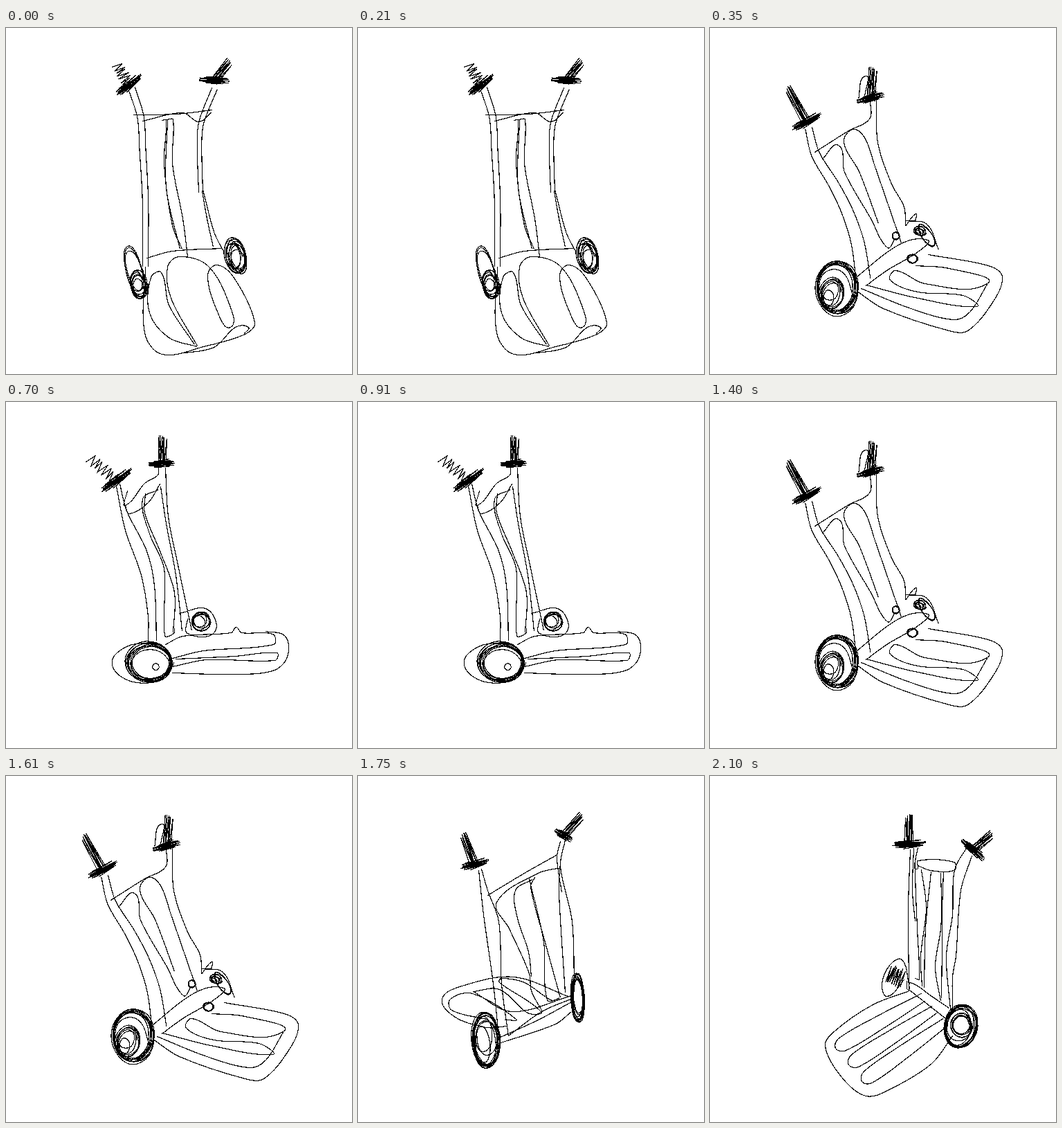
Animation, 500 px wide and 500 px high, one loop 2.45 s. Source, as an HTML page:

```html
<!DOCTYPE html>
<html lang="en">
<head>
<meta charset="utf-8">
<title>Hand truck turnaround</title>
<style>
  html, body { margin: 0; width: 100%; height: 100%; overflow: hidden; background: #fff; }
  svg { display: block; width: 100vw; height: 100vh; }
  path { fill: none; stroke: #000; stroke-width: 1.2; shape-rendering: crispEdges; }
  .pose { visibility: hidden; animation: turn 2450ms step-end infinite; }
  @keyframes turn {
    0% { visibility: visible; }
    14.2857%, 100% { visibility: hidden; }
  }
</style>
</head>
<body>
<svg id="stage" viewBox="0 0 500 500"></svg>
<script>
const STEP = 350, LOOP = 2450;
const stage = document.getElementById('stage');
let d, seed;

const random = () => (seed = (seed * 16807) % 2147483647) / 2147483647;
const jitter = size => (random() - 0.5) * 2 * size;
const at = (x, y) => `${(x + 0.5).toFixed(1)} ${(y + 0.5).toFixed(1)} `;

// Smooth pen stroke through x, y pairs; handles are a third of each segment
function pen(...xy) {
  const pts = [];
  for (let i = 0; i < xy.length; i += 2) pts.push([xy[i], xy[i + 1]]);
  const dirs = pts.map((p, i) => {
    const a = pts[i - 1] || p, b = pts[i + 1] || p;
    const len = Math.hypot(b[0] - a[0], b[1] - a[1]) || 1;
    return [(b[0] - a[0]) / len, (b[1] - a[1]) / len];
  });
  d += 'M' + at(...pts[0]);
  for (let i = 1; i < pts.length; i++) {
    const [x1, y1] = pts[i - 1], [x2, y2] = pts[i], [ux, uy] = dirs[i - 1], [vx, vy] = dirs[i];
    const h = Math.hypot(x2 - x1, y2 - y1) / 3;
    d += 'C' + at(x1 + ux * h, y1 + uy * h) + at(x2 - vx * h, y2 - vy * h) + at(x2, y2);
  }
}

// Two sides of a bar along a centre line, its width going from w1 to w2
function tube(w1, w2, ...xy) {
  const left = [], right = [], last = xy.length - 2;
  for (let i = 0; i <= last; i += 2) {
    const a = Math.max(i - 2, 0), b = Math.min(i + 2, last);
    const dx = xy[b] - xy[a], dy = xy[b + 1] - xy[a + 1];
    const k = (w1 + (w2 - w1) * i / last) / 2 / Math.hypot(dx, dy);
    left.push(xy[i] - dy * k, xy[i + 1] + dx * k);
    right.push(xy[i] + dy * k, xy[i + 1] - dx * k);
  }
  pen(...left);
  pen(...right);
}

// Straight slat with one rounded end
function slat(x1, y1, x2, y2, width) {
  const dx = x2 - x1, dy = y2 - y1, k = width / 2 / Math.hypot(dx, dy);
  const point = (t, side) => [x1 + dx * t - dy * k * side, y1 + dy * t + dx * k * side];
  pen(...point(0, 0.6), ...point(0.5, 1), ...point(0.93, 1), ...point(1, 0),
    ...point(0.93, -1), ...point(0.5, -1), ...point(0, -0.6));
}

// Round scribble: every turn drifts to another size and centre within the rim
function wheel(cx, cy, rx, ry, tilt = 0, turns = 3, inner = 0.7) {
  const xy = [], c = Math.cos(tilt * Math.PI / 180), s = Math.sin(tilt * Math.PI / 180);
  const ring = () => {
    const r = inner + (1 - inner) * random();
    return [r, jitter(1 - r), jitter(1 - r)];
  };
  let from = [1, 0, 0], to = ring();
  for (let i = 0; i <= turns * 8; i++) {
    if (i && i % 8 === 0) [from, to] = [to, ring()];
    const [r, ox, oy] = from.map((v, k) => v + (to[k] - v) * (i % 8) / 8);
    const a = i * Math.PI / 4;
    const x = rx * (r * Math.cos(a) + ox + jitter(0.04)), y = ry * (r * Math.sin(a) + oy + jitter(0.04));
    xy.push(cx + x * c - y * s, cy + x * s + y * c);
  }
  pen(...xy);
}

// Zigzag scribble along a line, spread sideways; lens makes the edges shorter
function hatch(x1, y1, x2, y2, width, count, lens = 0) {
  const mx = (x1 + x2) / 2, my = (y1 + y2) / 2, len = Math.hypot(x2 - x1, y2 - y1);
  const ux = (x2 - x1) / len, uy = (y2 - y1) / len;
  for (let i = 0; i <= count; i++) {
    const t = 2 * i / count - 1;
    const along = (i % 2 - 0.5) * len * (1 - lens * t * t) + jitter(len * 0.08);
    const side = t * width / 2 + jitter(1.5);
    d += (i ? 'L' : 'M') + at(mx + ux * along - uy * side, my + uy * along + ux * side);
  }
}

// Hand guard disc with a handle to the tip; a loose handle is scribbled crosswise
function grip(x, y, size, tilt, tipX, tipY, loose = false) {
  const ux = Math.cos(tilt * Math.PI / 180) * size / 2, uy = Math.sin(tilt * Math.PI / 180) * size / 2;
  hatch(x - ux, y - uy, x + ux, y + uy, 11, 20, 0.5);
  if (!loose) return hatch(x, y, tipX, tipY, 11, 14);
  const dx = x - tipX, dy = y - tipY, len = Math.hypot(dx, dy), k = 8 / len;
  const mx = (x + tipX) / 2, my = (y + tipY) / 2;
  hatch(mx - dy * k, my + dx * k, mx + dy * k, my - dx * k, len, 14);
}

function pose(slots, draw) {
  d = ''; seed = 4711;
  draw();
  for (const slot of slots) {
    const path = document.createElementNS('http://www.w3.org/2000/svg', 'path');
    path.setAttribute('d', d);
    path.setAttribute('class', 'pose');
    path.style.animationDelay = slot * STEP - LOOP + 'ms';
    stage.append(path);
  }
}

// Front, tipped towards the viewer
pose([0], () => {
  grip(177, 82, 44, -38, 160, 53, true);
  grip(300, 75, 42, 3, 323, 47);
  tube(10, 8, 181, 86, 194, 128, 197, 175, 201, 250, 201, 345);
  tube(8, 6, 301, 87, 282, 135, 279, 165, 281, 237);
  pen(283, 235, 290, 275, 299, 316);
  pen(284, 233, 300, 294, 313, 321);
  pen(184, 125, 245, 124, 298, 118);
  pen(197, 134, 255, 122, 278, 135, 297, 121);
  pen(224, 133, 231, 133, 228, 195, 240, 285, 254, 319);
  pen(231, 132, 241, 132, 240, 195, 255, 275, 262, 330);
  pen(233, 133, 231, 230, 251, 319);
  pen(203, 332, 240, 322, 313, 318);
  pen(201, 345, 200, 440, 225, 471, 285, 460, 345, 442, 359, 425, 330, 362, 305, 342, 291, 357,
    304, 407, 324, 432, 322, 398, 291, 343, 250, 330, 233, 345, 238, 390, 276, 459);
  pen(276, 460, 235, 447, 207, 411, 209, 360, 224, 353, 235, 400, 272, 457);
  pen(250, 470, 300, 461, 331, 432, 350, 432, 343, 442);
  wheel(185, 352, 13, 40, -15, 3);
  wheel(192, 370, 13, 22, -8, 7, 0.6);
  wheel(331, 329, 16, 28, -12, 10, 0.5);
});

// Three-quarter view, tipped; seen twice per loop
pose([1, 4], () => {
  grip(139, 135, 46, -28, 113, 88);
  grip(231, 101, 40, -15, 235, 57);
  pen(214, 102, 224, 69, 223, 99);
  tube(10, 21, 142, 144, 152, 182, 178, 225, 198, 265, 213, 310, 221, 363);
  pen(151, 179, 200, 148, 230, 131, 231, 104);
  pen(240, 100, 242, 165, 262, 225, 280, 258, 282, 286);
  pen(162, 189, 185, 169, 194, 208, 232, 275, 256, 317, 267, 304);
  pen(243, 282, 215, 207, 193, 165, 206, 146, 223, 158, 238, 200, 276, 310);
  pen(207, 363, 272, 313, 314, 306, 300, 323, 255, 350, 225, 372);
  pen(282, 286, 297, 268, 296, 279);
  pen(283, 278, 313, 283, 330, 320);
  pen(315, 327, 405, 344, 422, 360, 408, 396, 372, 437, 345, 437, 250, 405, 212, 380);
  pen(218, 376, 290, 405, 352, 421, 375, 410, 400, 370);
  pen(297, 343, 345, 347, 400, 369, 310, 369, 268, 350, 260, 364, 300, 381,
    365, 386, 385, 402, 300, 390, 225, 371);
  wheel(268, 300, 6, 6);
  wheel(303, 293, 10, 7, 15, 5, 0.4);
  wheel(312, 299, 8, 20, -35, 3);
  wheel(292, 333, 8, 7);
  wheel(183, 376, 31, 40, 0, 9, 0.8);
  wheel(175, 383, 19, 24, 10, 7, 0.5);
});

// Nearly side-on
pose([2], () => {
  grip(159, 113, 52, -36, 121, 81, true);
  grip(224, 89, 36, -3, 226, 49);
  pen(159, 121, 172, 185, 195, 250, 205, 310, 205, 345);
  pen(164, 118, 174, 157, 203, 215, 214, 265, 217, 345);
  pen(175, 128, 172, 149, 200, 117, 219, 105, 220, 93);
  pen(172, 150, 178, 161, 205, 145, 222, 118);
  pen(220, 126, 197, 140, 207, 190, 228, 240, 229, 337, 242, 334, 243, 327);
  pen(201, 132, 200, 160, 222, 215, 243, 275, 241, 333);
  pen(223, 122, 231, 175, 245, 250, 254, 331);
  pen(230, 95, 234, 165, 248, 235, 268, 330);
  pen(250, 305, 290, 299, 301, 332, 262, 334, 262, 312);
  pen(230, 350, 255, 338, 325, 333, 332, 325, 340, 333, 385, 335, 386, 350, 285, 359, 240, 370);
  pen(375, 331, 403, 338, 406, 368, 385, 388, 320, 393, 240, 391);
  pen(240, 382, 290, 372, 388, 373, 391, 362, 330, 367, 245, 371);
  wheel(281, 317, 15, 15, 0, 6, 0.6);
  wheel(197, 376, 46, 29, 0, 1, 0.95);
  wheel(205, 375, 36, 30, 0, 9);
  wheel(216, 382, 5, 5, 0, 1, 0.9);
});

// From behind
pose([3], () => {
  grip(180, 98, 44, -38, 156, 69, true);
  grip(293, 108, 54, 4, 314, 65);
  tube(10, 6, 185, 102, 188, 120, 193, 155, 201, 200, 203, 260, 205, 356);
  pen(186, 120, 235, 123, 287, 119, 286, 131, 240, 134, 197, 142);
  pen(197, 141, 210, 143, 220, 132, 230, 138, 255, 128);
  pen(217, 136, 218, 185, 222, 300, 238, 360);
  pen(220, 132, 221, 200, 229, 280, 236, 350, 248, 362);
  pen(239, 136, 239, 195, 246, 310, 258, 365, 266, 360);
  pen(276, 132, 274, 220, 276, 300, 270, 362);
  pen(281, 115, 293, 122, 283, 175, 282, 270, 286, 362);
  pen(195, 360, 232, 310, 250, 295, 310, 303, 342, 319, 325, 340, 285, 362, 279, 355, 310, 318, 341, 319);
  pen(195, 362, 260, 307, 271, 308, 235, 360);
  pen(247, 355, 280, 312, 288, 312, 265, 358);
  pen(203, 350, 246, 306, 285, 303, 322, 317);
  pen(163, 362, 297, 362);
  pen(196, 355, 270, 362);
  pen(200, 362, 265, 375, 295, 375);
  wheel(180, 352, 14, 48, 2, 9, 0.55);
  wheel(309, 370, 23, 39, 8, 12, 0.55);
});

// Three-quarter view from the other side
pose([5], () => {
  grip(168, 127, 40, -15, 152, 85);
  grip(296, 85, 28, 32, 323, 56);
  pen(292, 94, 287, 118, 294, 168);
  pen(299, 92, 292, 130, 309, 210, 312, 312);
  pen(174, 136, 181, 200, 195, 300, 203, 376);
  pen(178, 134, 187, 165, 203, 210, 207, 300, 217, 376);
  pen(187, 172, 240, 140, 288, 113);
  pen(293, 132, 260, 140, 200, 182, 218, 220, 247, 285, 250, 310, 266, 340);
  pen(252, 149, 227, 165, 230, 205, 246, 254, 250, 290);
  pen(247, 148, 268, 240, 273, 323, 291, 321);
  pen(255, 146, 249, 160, 270, 240, 292, 320);
  pen(291, 130, 290, 170, 299, 313);
  pen(303, 318, 225, 290, 150, 303, 121, 322, 140, 348, 185, 363, 215, 361);
  pen(185, 351, 135, 338, 133, 322, 165, 314, 228, 351, 212, 352);
  pen(166, 311, 204, 308, 245, 342, 264, 340, 204, 298, 206, 292, 240, 298, 280, 324, 291, 320);
  pen(166, 311, 222, 340, 308, 317);
  pen(203, 378, 260, 352, 310, 325);
  pen(203, 386, 285, 358, 308, 340);
  pen(217, 375, 265, 340, 312, 320);
  wheel(184, 381, 21, 42, -3, 11, 0.5);
  wheel(317, 321, 10, 36, -3, 10, 0.6);
});

// Front, turned to the left
pose([6], () => {
  grip(287, 98, 46, -4, 287, 58);
  grip(379, 106, 42, 42, 407, 83);
  pen(289, 106, 286, 190, 287, 300);
  pen(294, 104, 292, 165, 296, 210);
  pen(300, 103, 296, 125, 299, 220, 302, 293, 296, 292);
  pen(296, 122, 295, 133, 300, 133, 300, 122, 352, 124, 352, 136, 318, 136, 300, 129);
  pen(305, 135, 312, 190, 304, 260, 306, 304);
  pen(319, 138, 311, 220, 309, 306);
  pen(337, 139, 333, 220, 325, 275, 333, 325);
  pen(333, 140, 335, 220, 334, 321);
  pen(374, 98, 353, 135, 350, 200, 341, 260, 347, 337);
  pen(378, 115, 362, 165, 355, 260, 350, 290, 350, 337);
  pen(280, 294, 256, 318, 248, 300, 260, 272, 277, 265, 287, 300);
  hatch(263, 301, 272, 277, 22, 18);
  pen(284, 296, 286, 309, 289, 298, 320, 318, 345, 335);
  pen(288, 309, 340, 350);
  pen(288, 310, 235, 330, 180, 368, 166, 390, 190, 435, 225, 462, 260, 452, 320, 415, 350, 375);
  for (let i = 0; i < 3; i++) slat(308 + 16 * i, 319 + 18 * i, 181 + 19 * i, 393 + 24 * i, 20);
  wheel(362, 361, 24, 32, 12, 10, 0.75);
  wheel(361, 361, 17, 19, 0, 5, 0.6);
});
</script>
</body>
</html>
```
